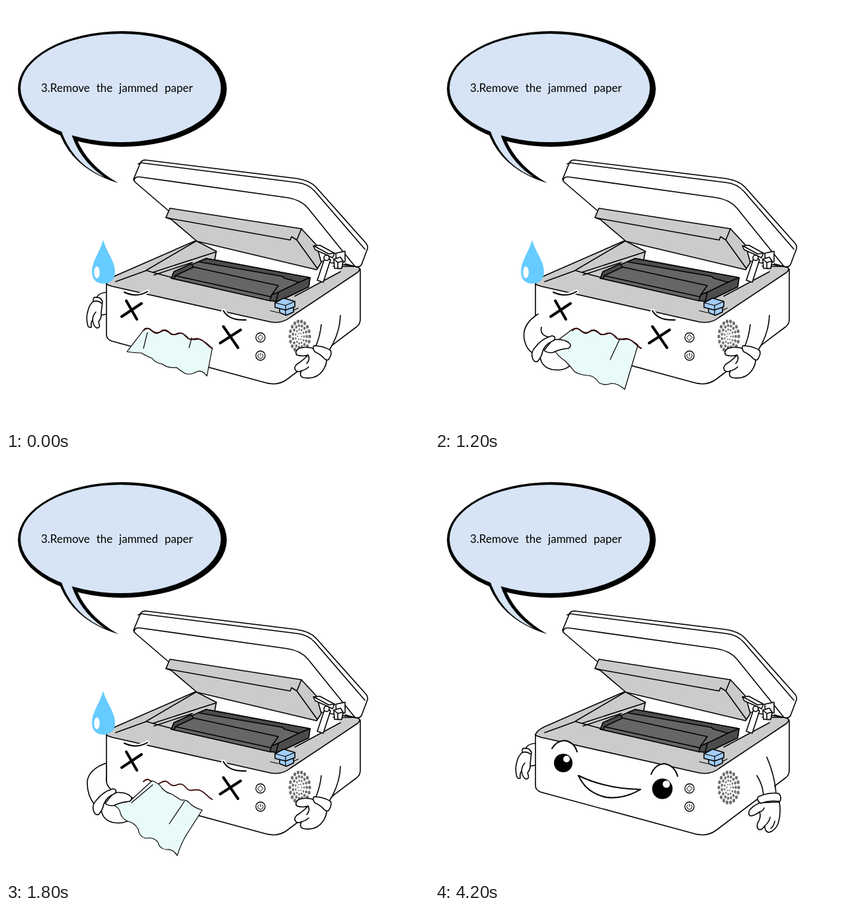
Recreate the animation shown at these times as an HTML page. Size 640x640 px, loop 5000 ms.

```html
<!DOCTYPE html>
<html lang="en">
<head>
<meta charset="utf-8">
<title>Remove the jammed paper</title>
<style>
  html, body { margin: 0; height: 100%; overflow: hidden; background: #fff; }
  svg { display: block; width: 100%; height: 100%; }
  .ink { fill: none; stroke: #000; stroke-width: 1.6; stroke-linejoin: round; stroke-linecap: round; }
  .w { fill: #fff; }
  .g { fill: #cbcbcb; }
  .d { fill: #666; }
  .dd { fill: #4c4c4c; }
  .b { fill: #a3cdf7; }
  .paper { fill: #e9fbf9; stroke-width: 1.2; }
  .cross { stroke-width: 4; }
  text { font: 17px Lato, sans-serif; word-spacing: 5.5px; }
</style>
</head>
<body>
<svg viewBox="0 0 640 640">
  <!-- speech bubble -->
  <ellipse cx="176" cy="125.5" rx="158" ry="87.5"/>
  <path d="M79 187Q98 246 170 268Q121 240 105 196Z"/>
  <g fill="#d6e4f5">
    <ellipse cx="173.5" cy="124" rx="151.5" ry="82"/>
    <path d="M82 184Q99 238 149 259Q112 234 99 194Z"/>
  </g>
  <text x="53" y="130">3.Remove the jammed paper</text>

  <g class="ink">
    <!-- arm on the far side -->
    <g data-on="05">
      <path class="w" d="M153 433Q140 434 137 441L143 468L153 466"/>
      <path class="w" d="M137 441Q143 440 146 447L144 464Q145 472 140 478Q144 488 137 487Q132 484 131 475Q128 479 129 486Q124 488 123 480Q121 470 124 461Q126 452 132 447Q131 439 137 441Z"/>
      <path d="M132 447Q139 445 145 450M136 463Q131 468 131 476"/>
    </g>

    <!-- body -->
    <path class="w" d="M152 419V497Q152 504 160 507L389 569Q410 576 425 565L531 485Q536 481 536 474V398L400 440Z"/>
    <path class="g" d="M152 421Q153 414 166 408L287 355L320 372L440 394L530 394Q539 397 532 403L430 471Q418 481 400 478L160 424Q154 422 152 421Z"/>
    <path class="w" stroke="none" d="M319 371L316 382L445 408L460 411L458 425L437 439L506 401L480 385Z"/>
    <path d="M287 356L212 400L222 403L318 372L316 383M166 417L213 400M222 403L252 411M224 407L282 388M437 439L506 402"/>

    <!-- roller unit -->
    <path class="d" d="M251 412L254 402L291 387L303 382L460 411L458 425L412 447L399 446L250 412Z"/>
    <path class="dd" d="M291 387L303 382L460 411L447 419L422 412L418 409Z"/>
    <path class="dd" d="M254 402L280 390L284 395L256 408L255 412L250 412ZM460 411L458 425L412 447L399 446L402 437L412 433L441 419Z"/>
    <path d="M284 395L412 423L402 437M256 408L401 440M412 433L409 446"/>

    <!-- lid -->
    <path class="w" d="M193 262L203 238Q205 233 211 233L440 261Q460 264 469 274L543 357Q548 362 547 367L538 391Q535 396 528 394L470 385L290 345L245 309L196 267Q193 264 193 262Z"/>
    <path d="M200 239Q204 236 210 238L440 267Q457 269 467 280L543 368M194 263Q196 257 205 259L426 290Q446 293 457 306L528 394"/>

    <!-- scanner unit -->
    <path class="g" d="M248 306L447 337L470 362L477 388L470 399L289 356L250 323L242 320Z"/>
    <path d="M242 320L251 322L430 354L432 349L440 354L447 337M440 354L471 397"/>

    <!-- hinge -->
    <path class="w" d="M483 379L471 415L480 418L491 384Z"/>
    <path class="w" d="M465 363L475 362L497 374L494 381L484 376L468 369ZM499 374L513 371V387L500 390Z"/>
    <path class="w" d="M496 383L506 380L510 386L508 397L497 397Z"/>
    <path d="M496 383L502 388L510 386M502 388V397M466 363L488 375L497 374"/>
    <circle class="w" cx="485" cy="381" r="4"/>
    <path d="M513 390L531 395"/>

    <!-- latch -->
    <path class="b" d="M414 456V464L424 468L435 463V453Z"/>
    <path class="b" d="M407 449L420 442L437 447V455L423 460L407 456Z"/>
    <path d="M407 449L423 453L437 447M423 453V467M400 461L412 464M436 460L442 457" stroke-width="1.2"/>

    <!-- controls -->
    <g stroke-width="1.3">
      <circle class="w" cx="385" cy="501.500" r="7"/>
      <circle class="w" cx="385" cy="529" r="7"/>
      <path d="M381 501.500L385 497L389 501.500L385 506ZM385 525V529M382 526.500A4 4 0 1 0 388 526.500" stroke-width="1"/>
    </g>
  </g>
  <g id="speaker" fill="#707070"></g>

  <g class="ink">
    <!-- worried face -->
    <g data-on="01234">
      <path d="M147 354C152 372 165 386 165 402C165 414 158 420 147.500 420C137 420 130 414 130 402C130 386 142 372 147 354Z" fill="#66ccff" stroke="none"/>
      <ellipse cx="137.500" cy="403" rx="4.200" ry="9" fill="#fff" stroke="none"/>
      <g stroke="#fff" stroke-width="6">
        <path d="M179 433Q198 442 214 432M329 461Q337 476 363 475"/>
      </g>
      <path stroke-width="2" d="M179 433Q198 442 214 432M329 461Q337 476 363 475"/>
      <path class="cross" d="M182 446L198 474M175 470L205 450M329 485L351 517M324 510L355 490"/>
      <path stroke="#3b0c0c" stroke-width="1.8" d="M208 491C216 483 219 492 226 495C233 497 236 488 243 491C249 495 250 498 256 497C265 493 268 495 273 501C280 509 286 500 295 505C303 509 303 513 312 518"/>
    </g>

    <!-- cheerful face -->
    <g data-on="5">
      <path class="w" stroke-width="2" d="M177 441Q184 429 197 429Q211 432 215 446M327 480Q333 465 347 464Q363 467 367 483"/>
      <circle cx="194" cy="463" r="14" fill="#000" stroke="none"/>
      <circle class="w" cx="199" cy="457" r="5" stroke="none"/>
      <circle cx="344" cy="502" r="15.500" fill="#000" stroke="none"/>
      <circle class="w" cx="350" cy="495" r="5.500" stroke="none"/>
      <path class="w" stroke-width="2" d="M217 482Q258 502 311 503Q285 518 260 515Q229 509 217 482Z"/>
    </g>

    <!-- near arm -->
    <g data-on="01234">
      <path class="w" stroke="none" d="M477 482L470 515L490 521L506 468Z"/>
      <path d="M477 482Q475 500 469 514M506 468Q505 495 490 519"/>
      <path class="w" d="M468 519Q455 514 443 518Q436 523 440 528Q449 531 457 528Q450 536 440 542Q435 547 438 551Q441 555 447 552Q443 559 449 562Q469 566 479 552Q486 542 485 533Z"/>
      <path d="M457 528Q461 534 455 541M447 552Q454 550 458 546"/>
      <path class="w" d="M466 514Q480 514 491 521Q494 526 488 535Q485 537 481 533Q476 527 467 523Q463 517 466 514Z"/>
    </g>
    <g data-on="5">
      <path class="w" stroke="none" d="M487 482L497 512L516 509L502 454Z"/>
      <path d="M487 482Q496 496 497 512M502 454Q514 482 516 509"/>
      <path class="w" d="M492 523Q482 527 476 534Q473 540 477 543Q483 543 491 537Q494 545 488 554Q486 562 491 564Q495 564 499 558Q499 567 505 568Q514 566 519 555Q524 540 521 522Z"/>
      <path d="M491 537Q496 536 498 531M499 558Q506 552 507 545M508 562Q513 558 514 551"/>
      <path class="w" d="M489 514Q504 507 520 509Q525 514 522 521Q506 519 493 524Q486 520 489 514Z"/>
    </g>

    <!-- pulling arm -->
    <g data-on="1"><path class="w" d="M158 467Q141 485 143 501Q146 523 163 530L186 498Q172 496 174 486"/></g>
    <g data-on="2"><path class="w" d="M156 466Q131 482 135 504Q138 520 149 526L174 501Q158 499 161 486"/></g>
    <g data-on="3"><path class="w" d="M152 463Q126 472 123 490Q122 512 135 527L160 504Q150 496 152 485Z"/></g>
    <g data-on="4"><path class="w" d="M152 460Q122 463 114 488Q112 505 118 518L148 499Q147 491 152 486Z"/></g>

    <g class="hand" data-on="1234">
      <path class="w" d="M160 510Q147 517 144 532Q145 549 162 553Q182 556 190 546L187 512Z"/>
    </g>

    <!-- paper -->
    <g data-on="01">
      <path class="paper" d="M183 523L210 488Q217 486 222 492Q230 497 237 490Q245 492 250 497Q257 498 264 495Q271 496 276 503Q283 506 292 504Q303 508 312 518L304 560Q297 550 289 553Q280 559 271 556Q263 551 258 547Q244 548 237 542Q226 540 221 533Q211 529 205 525Q194 525 183 523Z"/>
      <path d="M214 494L208 518M281 502L277 517" stroke-width="1.200"/>
    </g>
    <g data-on="2">
      <path class="paper" d="M171 517L208 489Q217 486 222 492Q230 497 237 490Q245 492 250 497Q257 498 264 495Q271 496 276 503Q283 506 292 504Q301 507 307 513L287 580Q277 571 267 571Q257 575 248 570Q241 559 231 559Q218 558 211 553Q204 544 197 537Q186 530 180 520Z"/>
      <path d="M280 503L265 535" stroke-width="1.200"/>
    </g>
    <g data-on="01 2"><path stroke="#3b0c0c" stroke-width="1.8" d="M208 491C216 483 219 492 226 495C233 497 236 488 243 491C249 495 250 498 256 497C265 493 268 495 273 501C280 509 286 500 295 505C303 509 303 513 312 518"/></g>
    <g data-on="3">
      <path class="paper" d="M158 526L187 521L221 490Q231 493 236 501Q242 508 251 510Q258 515 265 519Q274 518 279 525Q287 532 297 534L274 570Q266 582 259 603Q253 593 243 594Q232 593 230 583Q223 574 211 577Q201 574 200 563Q194 553 184 551Q174 547 172 535Q168 527 158 526Z"/>
      <path d="M270 521L247 555M222 496L190 523" stroke-width="1.200"/>
    </g>
    <g data-on="4">
      <path class="paper" d="M144 521L174 511L213 498Q229 500 240 510Q241 519 249 526Q252 538 263 545Q262 557 274 564L246 591Q231 601 220 619Q218 607 205 605Q197 600 195 590Q182 583 181 574Q176 566 177 555Q171 544 162 545Q158 533 153 527Z"/>
      <path d="M252 543L220 570" stroke-width="1.200"/>
    </g>

    <g class="hand" data-on="1234">
      <path class="w" d="M163 508Q178 506 187 512Q193 517 187 521Q174 522 164 527Q156 529 150 524Z"/>
      <path class="w" d="M133 537Q129 527 137 519Q147 506 162 502Q169 503 165 509Q152 514 148 525Q146 535 140 541Q135 542 133 537Z"/>
    </g>
  </g>
</svg>
<script>
  const rings = [[15, 23, 18, 2.1, 2.8], [10.5, 16.5, 15, 1.8, 2.4], [6.5, 10.5, 11, 1.3, 1.8], [3, 5, 6, 0.9, 1.2]];
  let dots = "";
  for (const [a, b, n, rx, ry] of rings)
    for (let i = 0; i < n; i++) {
      const t = i / n * 2 * Math.PI;
      dots += `<ellipse cx="${444.5 + a * Math.cos(t)}" cy="${500 + b * Math.sin(t)}" rx="${rx}" ry="${ry}"/>`;
    }
  document.getElementById("speaker").innerHTML = dots;

  const STEP = 600, LOOP = 5000;
  const handShift = ["0 0", "28 -8", "15 -3", "0 0", "-15 -5", "0 0"];
  const parts = document.querySelectorAll("[data-on]");
  const hands = document.querySelectorAll(".hand");
  const start = performance.now();

  function draw(now) {
    const time = Math.max(0, now - start) % LOOP;
    const pose = Math.min(5, Math.floor(time / STEP));
    for (const p of parts) p.style.display = p.dataset.on.includes(pose) ? "" : "none";
    for (const h of hands) h.setAttribute("transform", `translate(${handShift[pose]})`);
    requestAnimationFrame(draw);
  }
  draw(start);
</script>
</body>
</html>
```
